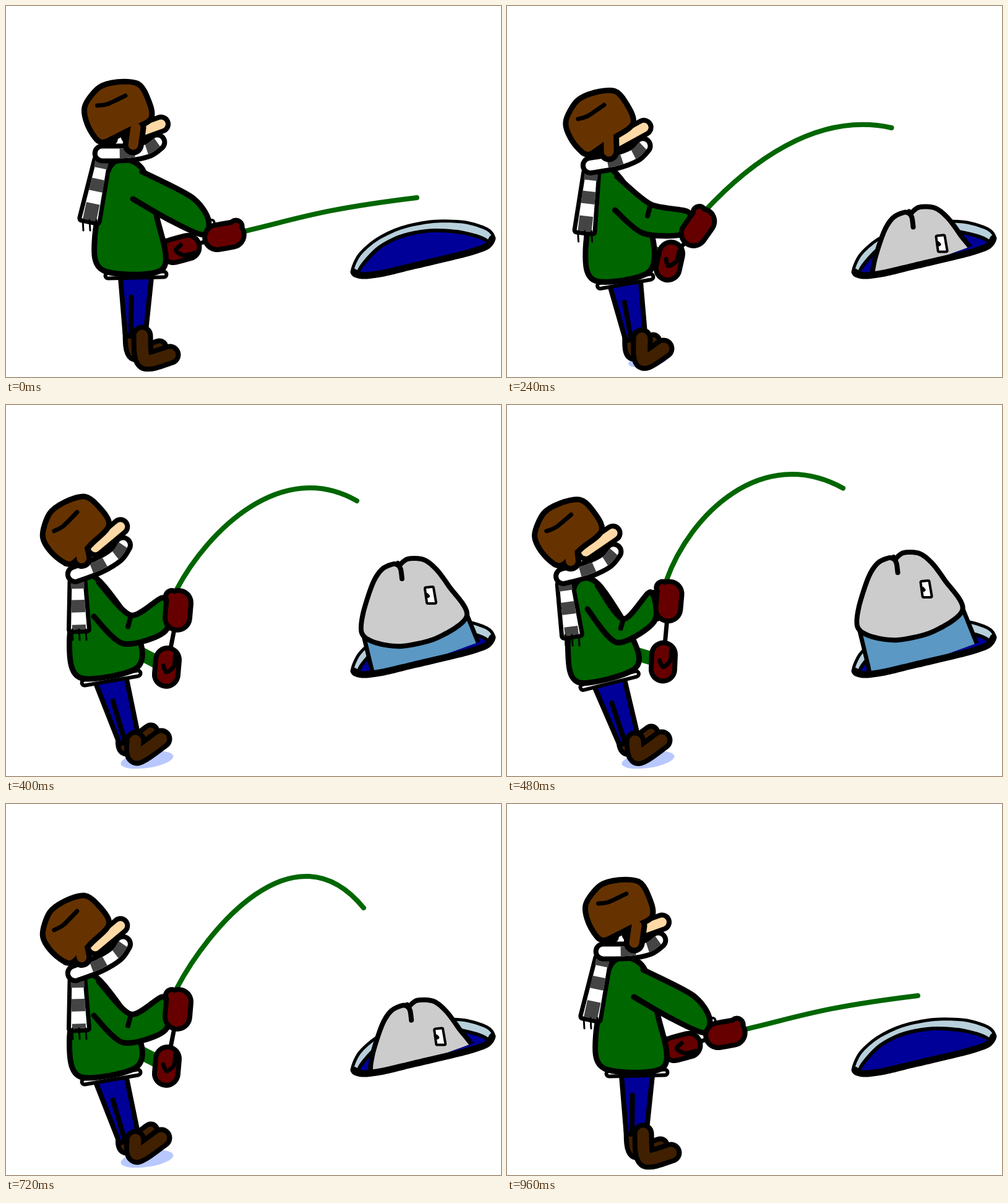
These frames come from a looping animation (800x600 px, 1 s). An HTML page with a canvas:

```html
<!DOCTYPE html>
<html lang="en">
<head>
<meta charset="utf-8">
<title>Ice fishing</title>
<style>
html, body { margin: 0; width: 100%; height: 100%; overflow: hidden; background: #fff; }
canvas { display: block; }
</style>
</head>
<body>
<canvas id="stage" width="800" height="600"></canvas>
<script>
const ctx = document.getElementById('stage').getContext('2d');
ctx.lineJoin = 'round';
const GREEN = '#006600', RED = '#660000', NAVY = '#000099', BOOT = '#402000', FUR = '#663300', GREY = '#444';

const points = s => s.split(' ').map(p => p.split(',').map(Number));
const mixPoint = (a, b, u) => [a[0] + (b[0] - a[0]) * u, a[1] + (b[1] - a[1]) * u];
const mix = (a, b, u) => a.map((p, i) => mixPoint(p, b[i], u));
const shift = (pts, dx, dy) => pts.map(([x, y]) => [x + dx, y + dy]);

// Turns local points by deg and moves them to the joint
function place(pts, [x, y], deg) {
  const c = Math.cos(deg * Math.PI / 180), s = Math.sin(deg * Math.PI / 180);
  return pts.map(([px, py]) => [x + px * c - py * s, y + px * s + py * c]);
}

// Curve through all points; straight if k is Infinity
function trace(pts, closed, k = 7) {
  const n = pts.length;
  const at = i => closed ? pts[(i + n) % n] : pts[Math.max(0, Math.min(n - 1, i))];
  ctx.beginPath();
  ctx.moveTo(...pts[0]);
  for (let i = 0; i < n - !closed; i++) {
    const [a, b, c, d] = [at(i - 1), at(i), at(i + 1), at(i + 2)];
    ctx.bezierCurveTo(b[0] + (c[0] - a[0]) / k, b[1] + (c[1] - a[1]) / k,
      c[0] - (d[0] - b[0]) / k, c[1] - (d[1] - b[1]) / k, ...c);
  }
  if (closed) ctx.closePath();
}

function line(pts, width, color = '#000', cap = 'round') {
  trace(pts);
  ctx.lineCap = cap;
  ctx.lineWidth = width;
  ctx.strokeStyle = color;
  ctx.stroke();
}

// Shapes: a filled area, a thick limb, a straight tapering strap
const area = (pts, k) => ({ pts, k, w: 0, closed: true });
const limb = (pts, w) => ({ pts, w, closed: false });
function strap(a, b, w0, w1) {
  const len = Math.hypot(b[0] - a[0], b[1] - a[1]);
  const nx = (a[1] - b[1]) / len / 2, ny = (b[0] - a[0]) / len / 2;
  const side = (p, w) => [p[0] + nx * w, p[1] + ny * w];
  return area([side(a, w0), side(a, -w0), side(b, -w1), side(b, w1)], Infinity);
}

// Shapes merged into one body with an ink outline around it
function paint(color, ink, ...shapes) {
  ctx.lineCap = 'round';
  for (const [tone, extra] of ink ? [['#000', 2 * ink], [color, 0]] : [[color, 0]])
    for (const { pts, k, w, closed } of shapes) {
      trace(pts, closed, k);
      ctx.fillStyle = ctx.strokeStyle = tone;
      ctx.lineWidth = w + extra;
      if (closed) ctx.fill();
      if (w + extra) ctx.stroke();
    }
}

function bands(pts, width, pattern) {
  ctx.setLineDash(pattern);
  line(pts, width, GREY, 'butt');
  ctx.setLineDash([]);
}

// Joints from standing to leaning back. head: place, then turn and flap shift; hands: place, then turn
const poses = [
  { head: '180,172 12,20', tail: '135,346', coat: '172,262 215,264 240,345 250,422 160,424 148,375',
    arm: '220,268 300,309 327,345 318,370 262,345 205,312', near: '353,372 80,0', far: '282,393 75,0',
    boot: '220,533 225,573 265,564', rod: '378,366 470,345 500,330 664,310', fish: '45,150' },
  { head: '167,187 6,5', tail: '134,360', coat: '158,270 185,272 236,365 232,420 146,427 135,385',
    arm: '187,271 248,319 313,342 305,372 235,363 182,320', near: '324,374 55,0', far: '267,415 20,0',
    boot: '222,530 225,574 257,561', rod: '332,354 420,280 530,210 637,203', fish: '13,79' },
  { head: '130,190 0,0', tail: '117,368', coat: '143,277 168,283 217,355 222,432 145,454 128,405',
    arm: '168,280 216,322 275,326 266,365 205,372 167,340', near: '293,342 15,0', far: '258,410 5,0',
    boot: '214,545 217,571 249,547', rod: '303,314 360,230 470,130 606,191', fish: '0,0' },
  { head: '112,203 -8,-12', tail: '118,363', coat: '122,288 148,288 208,372 208,422 122,437 107,385',
    arm: '150,287 202,340 255,312 258,365 190,386 142,342', near: '278,332 5,0', far: '260,424 5,0',
    boot: '209,543 212,566 251,540', rod: '276,298 325,205 445,85 567,155', fish: '-10,-37' },
  { head: '84,210 3,-14', tail: '92,381', coat: '104,303 140,297 188,382 199,424 114,452 99,405',
    arm: '142,296 174,352 208,293 218,335 165,382 118,318', near: '245,303 5,0', far: '245,407 0,0',
    boot: '205,545 214,567 249,544', rod: '239,270 265,150 380,40 519,114', fish: '-27,-57' }
].map(p => Object.fromEntries(Object.entries(p).map(([k, v]) => [k, points(v)])));

function poseAt(lean) {
  const i = Math.min(3, Math.floor(lean)), pose = {};
  for (const k in poses[i]) pose[k] = mix(poses[i][k], poses[i + 1][k], lean - i);
  return pose;
}

const rim = points('562,430 573,404 600,380 640,361 690,351 740,352 776,363 786,376 776,389 740,401 660,420 610,432 575,436');
const water = points('573,431 600,397 630,379 660,370 695,366 740,370 776,383 740,399 660,418 610,429');
const shore = points('540,0 540,440 580,432 650,421 700,407 760,385 800,370 800,0');
const snout = points('589,405 591,375 606,328 620,306 637,298 646,301 660,290 684,291 703,306 723,333 751,377 705,410 650,423 610,418');
const flank = points('591,408 605,465 616,520 800,500 771,425 752,378');

function hole([dx, dy]) {
  paint('#b8d0dc', 5, area(rim));
  paint(NAVY, 6, area(water));
  ctx.save();
  trace(shore, true, Infinity);
  ctx.clip();
  ctx.translate(dx, dy);
  paint('#5b98c4', 7, area(flank, Infinity));
  paint('#ccc', 8, area(snout));
  line(points('643,293 648,303 650,318'), 8);
  paint('#fff', 4, area(points('689,334 699,333 703,356 692,356'), Infinity));
  line(points('690,344 692,346'), 6);
  ctx.restore();
  line(rim.slice(7).concat([rim[0]]), 11);
}

function legs({ coat, boot }) {
  const [ankle] = shift(boot, -11, -3);
  const [hip] = shift([mixPoint(coat[3], coat[4], .5)], 5, 16);
  paint(BOOT, 8, limb(shift(boot, -17, -12), 13));
  paint(NAVY, 8, strap(hip, ankle, 42, 25));
  line(shift([mixPoint(hip, ankle, .35), ankle], -7, 0), 8);
  paint(BOOT, 8, limb(boot, 19));
}

const palm = points('0,-12 0,12'), thumb = points('-3,-4 -12,-21'), curl = points('12,-20 11,-2 0,8 -6,-2');

function body({ coat, arm, near, far, rod }, bent) {
  paint('#fff', 6, limb(shift([coat[3], coat[4]], 5, 12), 3));
  paint(GREEN, 0, limb([mixPoint(coat[2], coat[3], .5), far[0]], 22));
  line([far[0], near[0]], 7);
  paint(RED, 8, limb(place(palm, far[0], far[1][0]), 30));
  line(place(curl, far[0], far[1][0]), 7);
  paint(GREEN, 9, area(coat));

  ctx.beginPath();
  ctx.moveTo(...rod[0]);
  ctx.bezierCurveTo(...rod[1], ...rod[2], ...rod[3]);
  ctx.lineWidth = 8;
  ctx.stroke();

  const wrist = [arm[2], arm[3]];
  paint('#fff', 4, limb(mix(wrist, [near[0], near[0]], .2), 5));
  trace(arm);
  ctx.fillStyle = GREEN;
  ctx.fill();
  line(arm, 9);
  line([arm[1], mixPoint(arm[1], arm[4], .4 * bent)], 8);
  paint(RED, 8, limb(place(palm, near[0], near[1][0]), 32), limb(place(thumb, near[0], near[1][0]), 12));
}

const hat = points('-49,2 -34,-30 -8,-44 21,-48 38,-32 51,-3 21,21 0,38 -17,48 -38,29');
const fold = points('-34,-4 -18,-10 7,-29');
const wrap = points('-10,70 30,61 60,48 73,34');

function head({ head: [at, [turn, slide]], tail: [end] }) {
  const local = pts => place(pts, at, turn);
  const [top] = local([[-8, 82]]);
  paint('#fff', 7, strap(top, end, 18, 26));
  bands([top, end], 22, [12, 18, 20, 20, 40]);
  for (const dx of [-11, 0, 11]) line(shift([end, [end[0] + 1, end[1] + 17]], dx, 0), 3);

  const scarf = local(wrap);
  paint('#fff', 8, limb(scarf, 16));
  bands(scarf, 16, [0, 28, 24, 20, 40]);
  paint('#b36b2b', 6, limb(local(points('-20,46 0,44')), 8));
  paint('#ffd9a5', 8, limb(local(points('28,32 73,4')), 15));
  const flap = shift(points('14,18 16,46'), slide, 0);
  paint(FUR, 9, area(local(hat)), limb(local(flap), 16));
  line(local(fold), 7);
}

// Lean for each 80 ms step: a slow pull, then a quick fall
const pull = [0, .5, 1, 1.5, 2, 3, 3.5, 4, 3.5, 3, 2, 1, 0];

function render(step) {
  const lean = pull[step], pose = poseAt(lean), falling = step > 7;
  ctx.fillStyle = '#fff';
  ctx.fillRect(0, 0, 800, 600);
  // The fish drops ahead of the man and the rod springs up
  hole(poseAt(falling ? Math.max(0, lean - 1.4) : lean).fish[0]);
  if (falling && lean > 1) {
    pose.rod[2] = [pose.rod[2][0] + 20, pose.rod[2][1] - 55];
    pose.rod[3] = [pose.rod[3][0] + 11, pose.rod[3][1] + 13];
  }
  const spread = Math.min(1, lean / 2);
  ctx.fillStyle = '#b8c8ff';
  ctx.beginPath();
  ctx.ellipse(228, 574, 43 * spread, 13 * spread, -.15, 0, 7);
  ctx.fill();
  legs(pose);
  body(pose, Math.min(1, lean));
  head(pose);
}

const start = performance.now();
function tick() {
  render(Math.floor((performance.now() - start) % 1000 / 80));
  requestAnimationFrame(tick);
}
tick();
</script>
</body>
</html>
```
